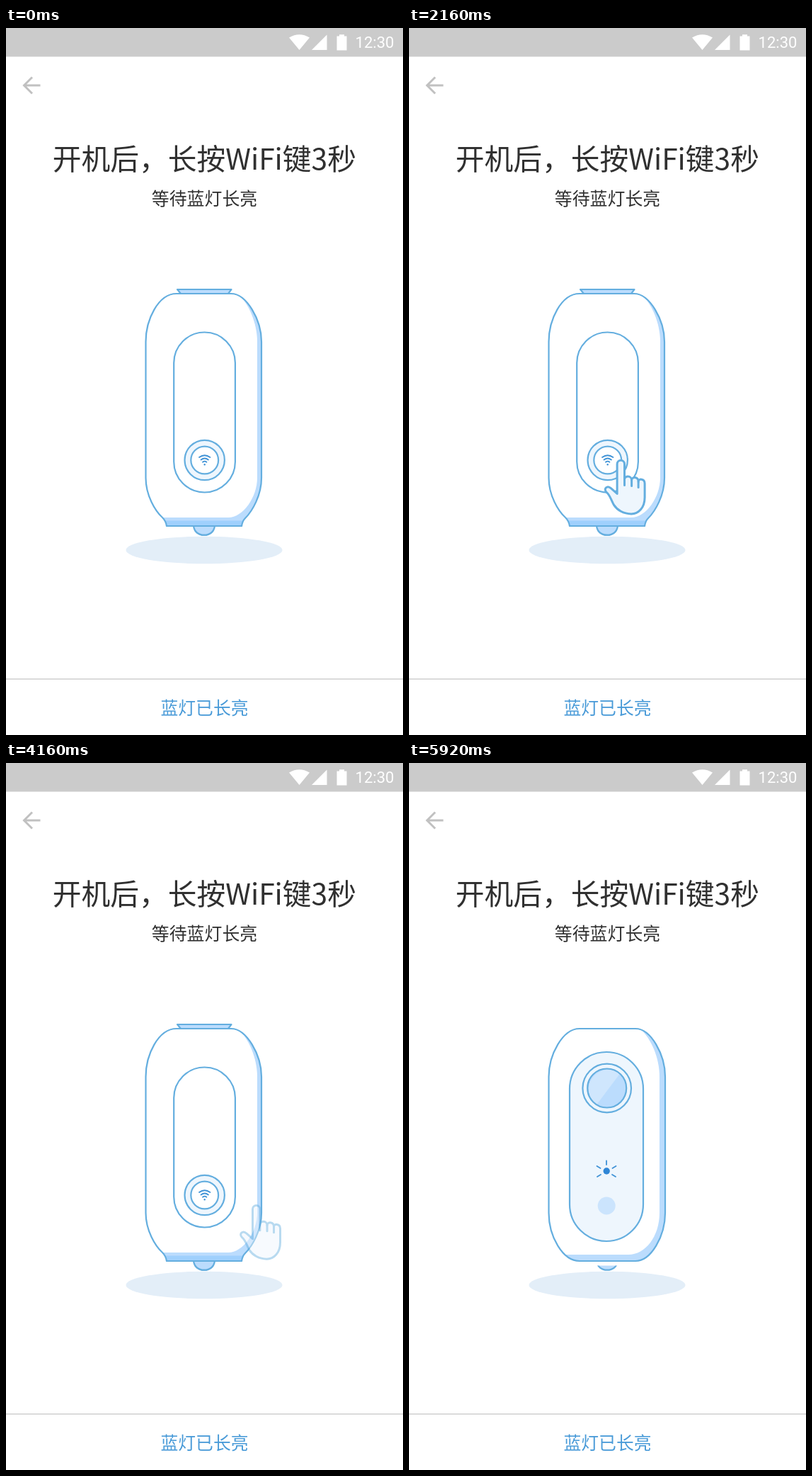
Animation, 561 px wide and 998 px high, one loop 7.68 s. Source, as an HTML page:

```html
<!DOCTYPE html>
<html lang="zh-CN">
<head>
<meta charset="utf-8">
<style>
  html, body { margin: 0; width: 100%; height: 100%; overflow: hidden; background: #fff; }
  svg { display: block; width: 100%; height: 100%; }
  text { font-family: "Noto Sans CJK SC", "Noto Sans CJK", sans-serif; text-anchor: middle; }
  .line { stroke: #64aedf; stroke-width: 2.2; stroke-linejoin: round; }
  .none { fill: none; }
  .white { fill: #fff; }
  .pale { fill: #eef6fd; }
  .shade { fill: #bbdcfd; }
  .icon { fill: none; stroke: #3f92d6; stroke-width: 1.8; stroke-linecap: round; }
</style>
</head>
<body>
<svg viewBox="0 0 561 998">
  <defs>
    <path id="knob" class="shade line" d="M265 703C266 711 272 715.7 280 715.7S294 711 295 703Z"/>
    <clipPath id="knobTip"><rect x="260" y="709.5" width="40" height="10"/></clipPath>
    <path id="backBody" d="M241 375H318C340 375 361 412 361 443V635C361 660 348 682 338 692Q334 696 333 703H227Q226 696 221 691C211 682 197.500 660 197.500 635V443C197.500 412 215 375 241 375Z"/>
    <path id="frontBody" d="M241 375H320C342 375 362 412 362 443V635C362 668 342 703 320 703H241C217 703 197.500 668 197.500 635V443C197.500 412 217 375 241 375Z"/>
    <clipPath id="inBack"><use href="#backBody"/></clipPath>
    <clipPath id="inFront"><use href="#frontBody"/></clipPath>
  </defs>

  <!-- status bar -->
  <rect width="561" height="40.500" fill="#cbcbcb"/>
  <g class="white">
    <path d="M400 13.500Q414.500 5 429 13.500L414.500 31Z"/>
    <path d="M432 31H453.500V9.500Z"/>
    <path d="M467.500 11.500H471V9.300H478V11.500H481.500V31.500H467.500Z"/>
    <text x="521" y="28" font-size="22" style="font-family: Roboto, sans-serif">12:30</text>
  </g>
  <path d="M48.500 81H26M37 69.500L25.500 81L37 92.500" fill="none" stroke="#c1c1c1" stroke-width="3"/>

  <g fill="#303030">
    <text x="280.300" y="200" font-size="40.750">开机后，长按WiFi键3秒</text>
    <text x="280.500" y="249.500" font-size="24.900">等待蓝灯长亮</text>
  </g>
  <path d="M0 919H561" stroke="#cfcfcf" stroke-width="1.300"/>
  <text x="280.500" y="968.500" font-size="24.800" fill="#4a9bd8">蓝灯已长亮</text>

  <ellipse cx="280" cy="737" rx="110.500" ry="19.300" fill="#e3eef8"/>
  <use href="#knob" clip-path="url(#knobTip)"/>

  <g id="back">
    <use href="#knob"/>
    <path class="shade line" d="M242 369H318.500L314 375H247Z"/>
    <g clip-path="url(#inBack)">
      <use href="#backBody" class="shade"/>
      <path class="white" d="M190 370H318C338 377 355 412 355 443V635C355 662 335 691 314 691H190Z"/>
      <path d="M215 695.500H345V705H215Z" fill="#9fd0fd"/>
    </g>
    <use href="#backBody" class="none line"/>
    <rect class="white line" x="237.200" y="429.500" width="86.700" height="226" rx="43.350"/>
    <circle class="pale line" cx="280.700" cy="610" r="28.200"/>
    <circle class="white line" cx="280.700" cy="610" r="19.400"/>
    <path class="icon" d="M273 606Q280.700 600.500 288.400 606M275.500 609.500Q280.700 605.500 285.900 609.500M278 612.700Q280.700 610.700 283.400 612.700"/>
    <circle cx="280.700" cy="616.300" r="1.200" fill="#3f92d6"/>
  </g>

  <g id="front">
    <g clip-path="url(#inFront)">
      <use href="#frontBody" class="shade"/>
      <path class="white" d="M190 370H318C338 379 354 412 354 443V635C354 668 334 694 310 694H190Z"/>
    </g>
    <use href="#frontBody" class="none line"/>
    <rect class="pale line" x="227" y="408" width="104" height="267" rx="52"/>
    <circle class="pale line" cx="279.700" cy="459" r="34.300"/>
    <circle class="shade" cx="279.700" cy="459" r="27.500"/>
    <path d="M298 438.500A27.500 27.500 0 1 0 265 482.500Z" fill="#cfe6fd"/>
    <circle class="none line" cx="279.700" cy="459" r="27.500"/>
    <circle cx="279.200" cy="576" r="4.700" fill="#2f86d6"/>
    <path class="icon" d="M279 561.500V567M292.500 569L287.500 572M265.500 569L270.500 572M266 584L271 581M292 584L287 581"/>
    <circle cx="279.200" cy="625" r="12.500" fill="#cbe4fd"/>
  </g>

  <g id="press" fill="#ff5a5a">
    <circle r="24.500" opacity=".32"/>
    <circle r="19" opacity=".23"/>
    <circle r="13.500" opacity=".3"/>
  </g>

  <g id="hand" class="line" style="stroke-width: 3; stroke-linecap: round">
    <path class="pale" d="M407 687V645a5.200 5.200 0 0 1 10.400 0V667C417.400 661 427.500 661 427.500 668c0 -5.500 9.500 -5.500 9.500 2c0 -5 9 -4.500 9 2.500V692C446 707 437 715.500 427 715.500C416 715.500 407 710 402.500 703C398 695 397 689 392 685C387 680 393 674.500 398.500 679.500Z"/>
    <path class="none" d="M417.400 667v8M427.500 668v8M437 670v8"/>
  </g>
</svg>
<script>
const LOOP = 7680, STEP = 80;
const [back, front, press, hand] = ["back", "front", "press", "hand"].map(id => document.getElementById(id));

const ramp = (t, from, to) => Math.min(1, Math.max(0, (t - from) / (to - from)));
const ease = p => (1 - Math.cos(Math.PI * p)) / 2;

function place(el, x, y, scale, opacity) {
  el.setAttribute("transform", `translate(${x} ${y}) scale(${scale})`);
  el.setAttribute("opacity", opacity);
}

function draw(now) {
  const t = Math.floor(now % LOOP / STEP) * STEP;

  // the hand slides to the button, then retreats a shorter way while fading
  const arrive = ease(ramp(t, 1173, 2428));
  const leave = ease(ramp(t, 3660, 4600));
  const x = 28 - 158 * arrive + 130 * leave;
  place(hand, x, x * 0.262, 1, ramp(t, 880, 1180) * (1 - leave));

  const glow = ramp(t, 2400, 2800) - ramp(t, 3600, 4000);
  place(press, 280.7, 610, 0.7 + 0.3 * glow, glow);

  back.setAttribute("opacity", 1 - ramp(t, 4640, 5120));
  front.setAttribute("opacity", ramp(t, 5000, 5440) * (t < 5920 ? 0.97 : 1));
}

const start = performance.now();
function tick() {
  draw(performance.now() - start);
  requestAnimationFrame(tick);
}
tick();
</script>
</body>
</html>
```
